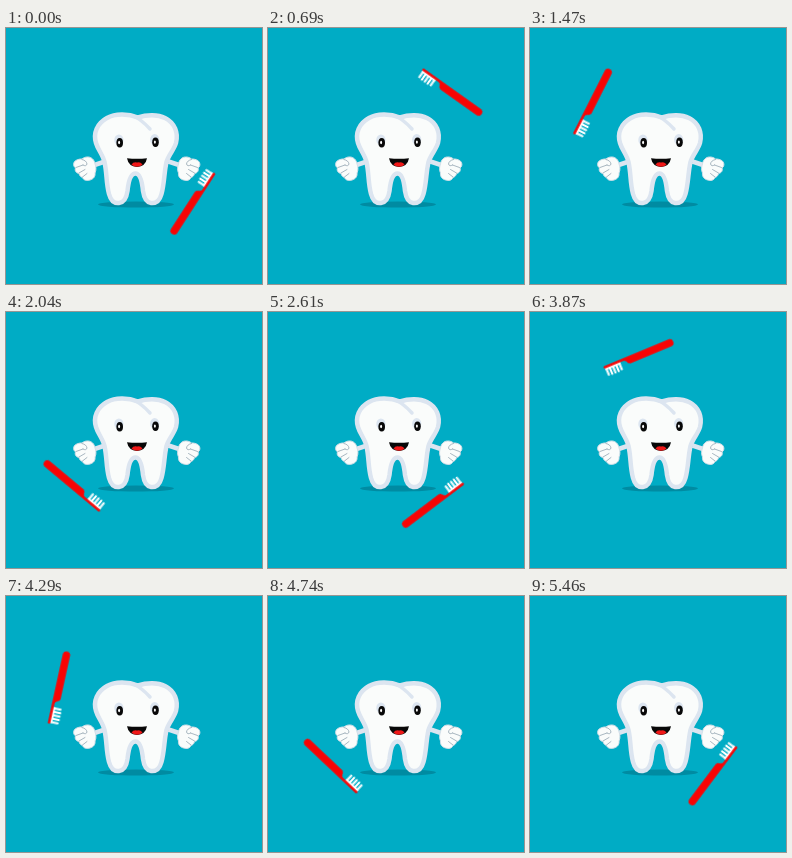
These frames come from a looping animation (256x256 px, 5490 ms). An HTML page:

```html
<!DOCTYPE html>
<html lang="en">
<head>
<meta charset="utf-8">
<title>Tooth and brush</title>
<style>
  html, body { margin: 0; width: 100%; height: 100%; overflow: hidden; background: #00acc5; }
  svg { display: block; width: 100vw; height: 100vh; }
  .orbit {
    transform-origin: 127.3px 121.3px;
    animation: orbit 5490ms linear infinite;
  }
  /* Two counter-clockwise turns with a slightly uneven pace */
  @keyframes orbit {
    0% { transform: rotate(0deg); }
    12.568% { transform: rotate(-87.5deg); }
    26.776% { transform: rotate(-186deg); }
    47.541% { transform: rotate(-340deg); }
    70.492% { transform: rotate(-505.5deg); }
    86.339% { transform: rotate(-619.5deg); }
    100% { transform: rotate(-720deg); }
  }
</style>
</head>
<body>
<svg viewBox="0 0 256 256" preserveAspectRatio="none">
  <defs>
    <g id="hand">
      <path d="M87 137.500 L99 133.500" stroke="#dce5f0" stroke-width="4.500"/>
      <path d="M89 136 C88.500 132 85.500 129 82 129 C79.500 128.800 77.500 129.800 76 131
               C73 130.800 69 132 68 134.500 C67 137 68 139 69.500 140
               C68.500 142.500 70 145 73 145.500 C73.500 148 75 149 76.500 149.500
               C77.500 152.500 81 153 84 152 C87.500 151 89.500 148.500 89 145
               C90.500 142 90 138.500 89 136 Z"
            fill="#fafcfb" stroke="#d3dfe8" stroke-width="1"/>
      <path d="M70 139.500 L77 137 M73 145 L79 141.500 M76.500 149 L81 145.500
               M76 131.500 Q80.500 132.500 81 136 Q80 139 77 137"
            fill="none" stroke="#93a5b2" stroke-width=".8" stroke-linecap="round"/>
    </g>
    <g id="eye">
      <ellipse cx="-.8" cy="-2.800" rx="4.600" ry="5.400" fill="#dce5f0"/>
      <ellipse rx="3.300" ry="4.700" fill="#080808"/>
      <ellipse cx="-.6" cy="-.2" rx="1" ry="1.700" fill="#fff"/>
    </g>
  </defs>

  <rect width="256" height="256" fill="#00acc5"/>
  <ellipse cx="130" cy="176.500" rx="38" ry="3.100" fill="#008ba2"/>

  <use href="#hand"/>
  <use href="#hand" transform="translate(261.500 0) scale(-1 1)"/>

  <path d="M132 89.500 C122 85.500 109 85.500 101 90 C91 95.500 87 105 90 115
           C92 122 97 127 98.500 134 C101 145 100 155 103 166 C105 173.500 109 175.500 113 175
           C118 174.500 120.500 170 121.500 163 C122.500 153 125 145.500 129.500 145.500
           C134 145.500 136 153 137 163 C138 170 140.500 174.500 145 175
           C149.500 175.500 153.500 173.500 155.500 166 C158.500 155 158 145 160.500 134
           C162.500 127 168 122 170 115 C172.500 105 169 95 159 90
           C152 86.500 141 86.500 132 89.500 Z"
        fill="#fafcfb" stroke="#dce5f0" stroke-width="4.500" stroke-linejoin="round"/>
  <path d="M128 88.500 C134 91 139 95.500 144 101" fill="none"
        stroke="#dce5f0" stroke-width="3.500" stroke-linecap="round"/>

  <use href="#eye" x="113.700" y="114.700"/>
  <use href="#eye" x="149.500" y="114.300"/>

  <path d="M121 130.300 Q131 131.300 141 130.300 Q139.500 138.600 131 139 Q122.500 138.600 121 130.300 Z" fill="#080808"/>
  <path d="M125.500 136.800 Q127 133.800 131 134.500 Q135 133.200 136.500 136.800 Q134 138.800 131 138.800 Q128 138.800 125.500 136.800 Z" fill="#f01818"/>

  <g class="orbit">
    <g transform="translate(168 203) rotate(-57)">
      <path d="M54.500 2 V-6 M58 2 V-6.500 M61.500 2 V-6.500 M65 2 V-6.500 M68.500 2 V-6"
            stroke="#fff" stroke-width="2.100" stroke-linecap="round"/>
      <path d="M53.500 -.6 H69.500 V2 H53.500 Z" fill="#fff"/>
      <path d="M0 -3.700 H44 C47 -3.700 47 1.300 50 1.300 H70 Q71.500 2.500 70 3.700 H0 A3.700 3.700 0 0 1 0 -3.700 Z"
            fill="#f80404"/>
    </g>
  </g>
</svg>
</body>
</html>
```
